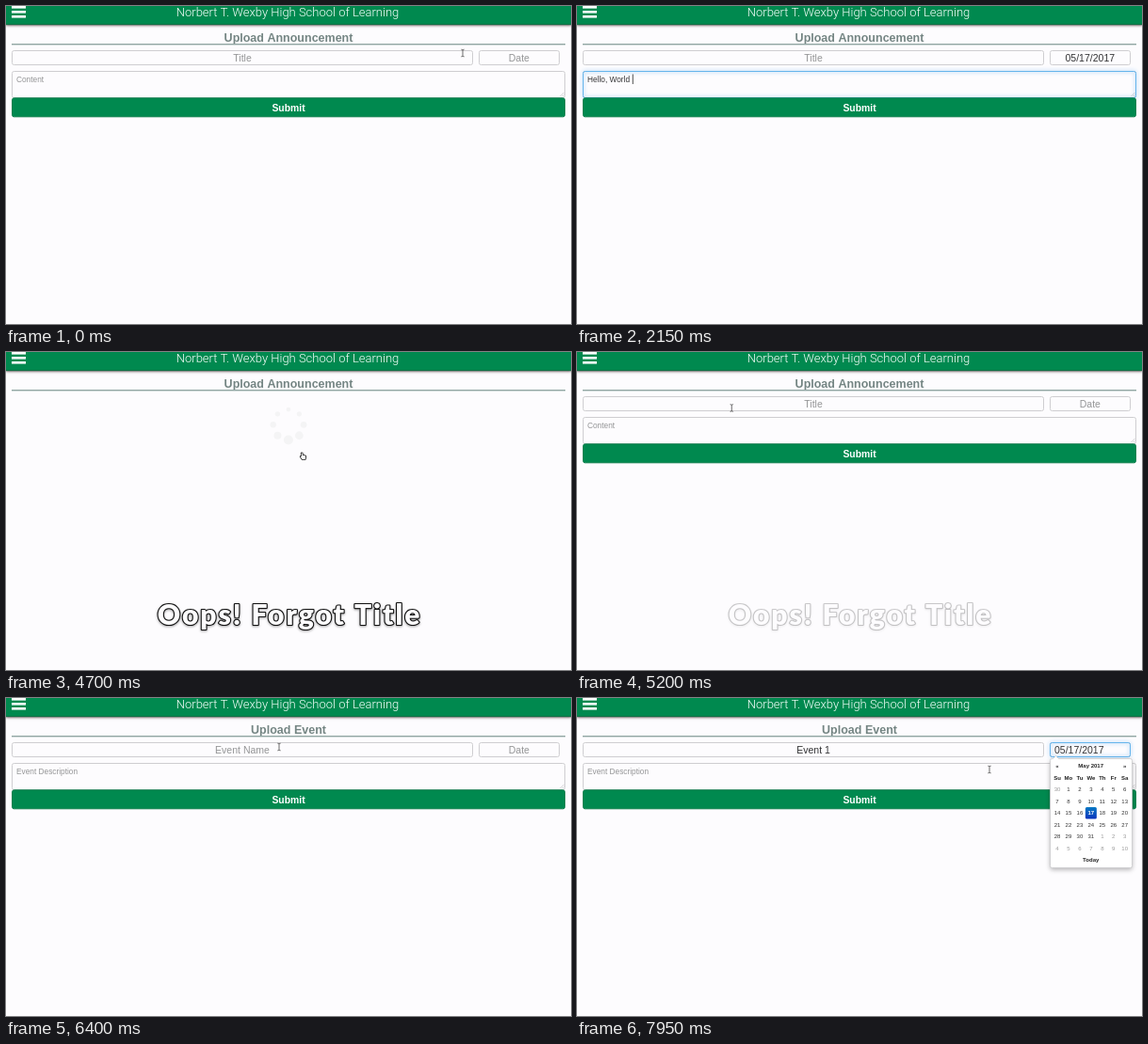
Recreate the animation shown at these times as an HTML page with a canvas. Size 600 by 338 pixels, loop 8 s.

```html
<!DOCTYPE html>
<html lang="en">
<head>
<meta charset="utf-8">
<title>Upload form</title>
<style>
  html, body { margin: 0; width: 100%; height: 100%; overflow: hidden; background: #fdfcfe; }
  canvas { display: block; width: 600px; height: 338px; }
</style>
</head>
<body>
<canvas></canvas>
<script>
const W = 600, H = 338, LOOP = 8000, STEP = 50;
const GREEN = '#00894f', PAPER = '#fdfcfe', MUTED = '#949596', INK = '#333335', HEADING = '#748583';
const SANS = '"Liberation Sans", Arial, sans-serif';
const MENU_WIDTH = 124, MENU_SHIFT = 131;

const canvas = document.querySelector('canvas');
const ctx = canvas.getContext('2d');
const scale = window.devicePixelRatio || 1;
canvas.width = W * scale;
canvas.height = H * scale;

let now = 0;

// Timing helpers
const ramp = (from, to) => Math.min(1, Math.max(0, (now - from) / (to - from)));
const swing = p => 0.5 - Math.cos(Math.PI * p) / 2;
const during = (from, to) => now >= from && now < to;
const pulse = (from, to, fade = 150) => ramp(from, from + fade) * (1 - ramp(to, to + fade));
const typed = (string, from, to) => string.slice(0, Math.floor(ramp(from, to) * string.length + 0.001));

// Drawing helpers
function text(string, x, y, size, color, { weight = 400, align = 'center', family = SANS } = {}) {
  ctx.font = `${weight} ${size}px ${family}`;
  ctx.textAlign = align;
  ctx.fillStyle = color;
  ctx.fillText(string, x, y);
}

function rect(x, y, w, h, color) {
  ctx.fillStyle = color;
  ctx.fillRect(x, y, w, h);
}

function rounded(x, y, w, h, r) {
  ctx.beginPath();
  ctx.roundRect(x, y, w, h, r);
}

function stroke(color, width = 1) {
  ctx.strokeStyle = color;
  ctx.lineWidth = width;
  ctx.stroke();
}

function layer(alpha, draw) {
  if (alpha <= 0) return;
  ctx.save();
  ctx.globalAlpha *= alpha;
  draw();
  ctx.restore();
}

function field(x, y, w, h, glow = 0, invalid = 0) {
  rounded(x + 0.5, y + 0.5, w - 1, h - 1, 2);
  stroke('#cfced1');
  layer(invalid, () => stroke('#ffcbc5'));
  layer(glow, () => {
    ctx.shadowColor = '#66afe9';
    ctx.shadowBlur = 4 * scale;
    stroke('#66b5ec');
  });
}

function caret(x, y, h, since) {
  if (Math.floor((now - since) / 530) % 2 === 0) rect(x, y, 0.8, h, '#222');
}

function header() {
  ctx.save();
  ctx.shadowColor = 'rgba(60,20,30,.6)';
  ctx.shadowBlur = 2.5 * scale;
  ctx.shadowOffsetY = 0.8 * scale;
  rect(0, -5, W, 25, GREEN);
  ctx.restore();
  rect(0, 19.4, W, 0.8, '#17603f');
  text('Norbert T. Wexby High School of Learning', 299, 11, 13, '#f8fffb',
    { weight: 300, family: 'Roboto, sans-serif' });
  if (during(5500, 6000)) {
    ctx.beginPath();
    ctx.moveTo(6.5, 6.3);
    ctx.lineTo(17, 6.3);
    ctx.moveTo(12.3, 1.6);
    ctx.lineTo(17, 6.3);
    ctx.lineTo(12.3, 11);
    stroke('#fff', 2.3);
  } else {
    for (const y of [0, 5, 10]) rect(6, y, 15, 2.6, '#fff');
  }
}

function sidebar(shift) {
  if (!shift) return;
  const left = shift - MENU_SHIFT, middle = left + MENU_WIDTH / 2;
  rect(left + MENU_WIDTH - 0.5, 20, 1, H - 20, '#b9b8bc');
  text('Announcement', middle, 48.5, 9.6, HEADING, { weight: 700 });
  rect(left, 54, MENU_WIDTH, 1.3, '#91a4a1');
  text('Upload Event', middle - 3, 73, 9.6, HEADING, { weight: 700 });
  rect(left, 78.5, MENU_WIDTH, 1, '#c7c2cb');
}

function titleField(isEvent) {
  const glow = isEvent ? pulse(6500, 7200) : pulse(3700, 4500);
  const value = isEvent ? typed('Event 1', 6650, 7050)
    : now < 4950 ? typed('Test', 3800, 4150) : '';
  const focused = isEvent ? during(6500, 7200) : during(3700, 4500);
  field(6, 47, 490, 16, glow, isEvent ? 0 : pulse(3280, 3700));
  text(value || (isEvent ? 'Event Name' : 'Title'), 251, 59.3, 10.5, value ? INK : MUTED);
  if (focused) {
    const half = value ? ctx.measureText(value).width / 2 : 0;
    caret(251 + half, 50.5, 10, isEvent ? 6500 : 3700);
  }
}

function dateField() {
  const focused = during(200, 770) || now >= 7200;
  const chosen = during(550, 4950) || now >= 7600;
  field(502, 47, 86, 16, Math.max(pulse(200, 770), pulse(7200, 9000)));
  const value = chosen ? '05/17/2017' : focused ? 'mm/dd/yyyy' : 'Date';
  text(value, focused ? 507 : 544.8, 59.3, 10.5, chosen ? INK : MUTED,
    { align: focused ? 'left' : 'center' });
}

function contentField(isEvent) {
  const value = now < 4950 ? typed('Hello, World :)', 1000, 2250) : '';
  field(6, 69, 588, 29, pulse(780, 3250));
  text(value || (isEvent ? 'Event Description' : 'Content'), 11, 80.5, 8.3,
    value ? INK : MUTED, { align: 'left' });
  if (during(780, 3250)) {
    const typing = during(1000, 2250);
    caret(value ? 11.5 + ctx.measureText(value).width : 11.2, 72.5, 10.5,
      typing ? now : now < 1000 ? 780 : 2250);
  }
  ctx.beginPath();
  ctx.moveTo(588.5, 96);
  ctx.lineTo(592.5, 92);
  ctx.moveTo(591, 96);
  ctx.lineTo(592.5, 94.5);
  stroke('#b5b4b7', 0.6);
}

function form(isEvent) {
  titleField(isEvent);
  dateField();
  contentField(isEvent);
  rounded(6.5, 97.8, 587, 20, 2);
  ctx.fillStyle = GREEN;
  ctx.fill();
  stroke('#0b7c49', 0.9);
  text('Submit', 300, 111.7, 10.4, '#fff', { weight: 700 });
}

function spinner() {
  const turn = Math.floor((now - 4700) / 100);
  for (let i = 0; i < 8; i++) {
    const angle = (i + 2 + turn) * Math.PI / 4;
    ctx.beginPath();
    ctx.arc(299.9 + 16.2 * Math.cos(angle), 77.3 + 16.2 * Math.sin(angle), [5, 4, 3.2, 2.7, 2.4, 2.6, 3.4, 4.4][i], 0, 7);
    ctx.fillStyle = '#f4f4f5';
    ctx.fill();
  }
}

function picker(selected) {
  ctx.save();
  ctx.shadowColor = 'rgba(0,0,0,.3)';
  ctx.shadowBlur = 5 * scale;
  ctx.shadowOffsetY = 2 * scale;
  rounded(502.5, 64.5, 87, 116, 2);
  ctx.fillStyle = '#fff';
  ctx.fill();
  ctx.restore();
  stroke('#c9c9cc', 0.8);
  ctx.beginPath();
  ctx.moveTo(505, 65);
  ctx.lineTo(508.5, 61.5);
  ctx.lineTo(512, 65);
  ctx.fillStyle = '#fff';
  ctx.fill();
  stroke('#c9c9cc', 0.6);

  const bold = { weight: 700 };
  const column = i => 510 + i * 11.95;
  text('«', column(0), 74.3, 6, INK, bold);
  text('May 2017', 545.7, 74.3, 6, '#222', bold);
  text('»', column(6), 74.3, 6, INK, bold);
  ['Su', 'Mo', 'Tu', 'We', 'Th', 'Fr', 'Sa'].forEach((day, i) => text(day, column(i), 87, 6, '#222', bold));
  for (let i = 0; i < 42; i++) {
    const date = new Date(2017, 3, 30 + i);
    const x = column(i % 7), y = 97.2 + Math.floor(i / 7) * 12.5;
    const inMonth = date.getMonth() === 4;
    const active = selected && inMonth && date.getDate() === 17;
    if (active) {
      const blue = ctx.createLinearGradient(0, y - 6, 0, y + 6);
      blue.addColorStop(0, '#0878c4');
      blue.addColorStop(1, '#0a35bd');
      rounded(x - 6, y - 6.3, 12, 12.6, 1.5);
      ctx.fillStyle = blue;
      ctx.fill();
    }
    text(date.getDate(), x, y + 2.2, 6, active ? '#fff' : inMonth ? '#333' : '#999', { weight: active ? 700 : 400 });
  }
  text('Today', 545.7, 174.3, 6, '#222', bold);
}

// Only the outline fades; the white inside stays opaque so that nothing shows through it.
function caption(alpha) {
  if (!alpha) return;
  const label = 'Oops! Forgot Title';
  ctx.save();
  ctx.font = '900 30px Lato, sans-serif';
  ctx.letterSpacing = '1.95px';
  ctx.textAlign = 'center';
  ctx.lineJoin = 'round';
  layer(alpha, () => {
    ctx.shadowColor = 'rgba(0,0,0,.4)';
    ctx.shadowBlur = 2.5 * scale;
    ctx.shadowOffsetY = 1.3 * scale;
    ctx.strokeStyle = '#111';
    ctx.lineWidth = 2.2;
    ctx.strokeText(label, 301, 290);
  });
  ctx.fillStyle = PAPER;
  ctx.fillText(label, 301, 290);
  ctx.restore();
}

// Pointer stops: time, x, y
const STOPS = [
  [0, 485, 50], [200, 538, 55], [300, 538, 55], [500, 547, 122], [570, 547, 122], [780, 367, 86],
  [2400, 367, 86], [3000, 319, 110], [3450, 319, 110], [3700, 300, 56], [4150, 300, 56],
  [4450, 315.5, 111], [5000, 315.5, 111], [5400, 13, 8], [5550, 13, 8], [5650, 18, 18], [5870, 35, 70],
  [5970, 35, 70], [6400, 290, 52], [7000, 290, 52], [7180, 540, 56], [7280, 540, 56],
  [7500, 547, 122], [7650, 547, 122], [7950, 438, 76], [8000, 438, 76]
];

function pointerPosition() {
  const i = STOPS.findIndex(stop => stop[0] > now);
  const [t0, x0, y0] = STOPS[i - 1], [t1, x1, y1] = STOPS[i];
  const p = swing(ramp(t0, t1));
  return [x0 + (x1 - x0) * p, y0 + (y1 - y0) * p];
}

const SHAPES = {
  arrow: new Path2D('M-1.5-3.5V3L0 1.7 1 4 2 3.5 1 1.3H3Z'),
  hand: new Path2D('M-1.8-3.5Q-.8-4-.6-3V-1.2L2-.8Q3-.5 2.8.6L2.2 3H-1L-2.8.4Q-2.7-.5-1.7 0Z'),
  beam: new Path2D('M-1.6-3.8Q0-3.8 0-3 0-3.8 1.6-3.8M0-3V3M-1.6 3.8Q0 3.8 0 3 0 3.8 1.6 3.8')
};

function pointer(pickerOpen, shift) {
  if (during(1000, 2400) || during(3800, 4150) || during(6650, 7000)) return;
  const [x, y] = pointerPosition();
  const onLink = shift > 0 && x < shift && y > 38 && y < 80;
  const onButton = y > 98 && y < 118;
  const onMenu = y < 14 && x < 22;
  const onDay = pickerOpen && x > 502 && y > 65;
  const onField = (y > 46 && y < 64) || (y > 69 && y <= 98);
  const kind = onLink || onButton || onMenu || onDay ? 'hand' : onField ? 'beam' : 'arrow';
  ctx.save();
  ctx.translate(x, y);
  if (kind === 'beam') {
    ctx.strokeStyle = '#444';
    ctx.lineWidth = 0.8;
    ctx.stroke(SHAPES.beam);
  } else {
    ctx.fillStyle = kind === 'hand' ? '#fff' : '#111';
    ctx.strokeStyle = kind === 'hand' ? '#111' : '#ddd';
    ctx.lineWidth = kind === 'hand' ? 1.6 : 0.7;
    ctx.stroke(SHAPES[kind]);
    ctx.fill(SHAPES[kind]);
  }
  ctx.restore();
}

function draw() {
  ctx.setTransform(scale, 0, 0, scale, 0, 0);
  rect(0, 0, W, H, PAPER);
  const isEvent = now >= 5960;
  const shift = MENU_SHIFT * swing(ramp(5495, 5795)) * (1 - swing(ramp(5960, 6260)));
  const pickerAlpha = Math.max(pulse(200, 740, 50), pulse(7220, 9000, 50));

  sidebar(shift);
  ctx.save();
  ctx.translate(shift, 0);
  text(isEvent ? 'Upload Event' : 'Upload Announcement', 300, 38, 12.5, HEADING, { weight: 700 });
  rect(6, 40, 588, 1.4, '#90a5a2');
  layer(1 - pulse(4520, 4950, 100), () => form(isEvent));
  layer(pulse(4580, 4930, 100), spinner);
  ctx.restore();

  layer(pickerAlpha, () => picker(during(550, 4950) || now >= 7600));
  header();
  caption(ramp(3300, 3800) * (1 - ramp(4800, 5300)));
  pointer(pickerAlpha > 0, shift);
}

function frame(time) {
  now = Math.floor((time % LOOP) / STEP) * STEP;
  draw();
  requestAnimationFrame(frame);
}
requestAnimationFrame(frame);
</script>
</body>
</html>
```
